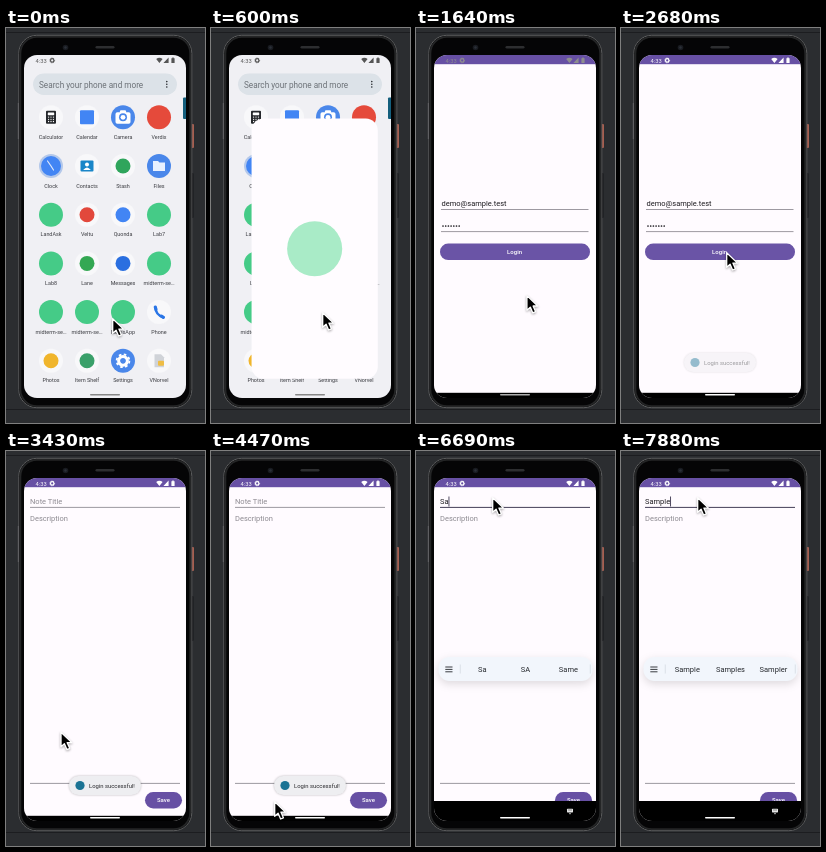
Recreate the animation shown at these times as an HTML page. Size 199 by 395 pixels, loop 8 s.

```html
<!DOCTYPE html>
<html lang="en">
<head>
<meta charset="utf-8">
<title>Notes app walkthrough</title>
<style>
html, body { margin: 0; width: 100%; height: 100%; overflow: hidden; background: #2b2d30; }
svg { display: block; width: 100%; height: 100%; font-family: Roboto, sans-serif; }
.label { font-size: 5.4px; text-anchor: middle; fill: #3a3b40; }
.field { font-size: 7.5px; fill: #1d1b20; }
.hint { font-size: 7.5px; fill: #8d8a91; }
.btn { font-size: 6px; font-weight: 500; text-anchor: middle; fill: #fff; }
.word { font-size: 7.5px; text-anchor: middle; fill: #24272c; }
.rule { stroke: #85818a; stroke-width: .8; }
#toast { filter: drop-shadow(0 .8px 1px #0004); }
#bar { filter: drop-shadow(0 3px 4px #0002); }
#cursor { filter: drop-shadow(.5px 1px .8px #0005); }
</style>
</head>
<body>
<svg viewBox="0 0 199 395">
  <defs>
    <clipPath id="glass"><rect x="18" y="27" width="162" height="343" rx="13"/></clipPath>
    <clipPath id="pill"><rect x="24" y="215.6" width="150" height="16.5" rx="8.2"/></clipPath>
  </defs>

  <rect width="199" height="395" fill="#2b2d30"/>
  <path d="M0 4.5H199M0 381.5H199" stroke="#1c1d20"/>
  <rect x="185" y="96" width="3" height="24" rx="1" fill="#a75f50"/>
  <rect x="185" y="145" width="2.5" height="45" rx="1" fill="#17181a"/>
  <rect x="12.8" y="7.3" width="173" height="372.4" rx="18" fill="#050506" stroke="#5c5d5e"/>
  <rect x="14.4" y="8.9" width="169.8" height="369.2" rx="16.5" fill="none" stroke="#242526" stroke-width="1.8"/>
  <path d="M12.3 75V111" stroke="#6b6c6f" stroke-width=".8"/>
  <circle cx="59.5" cy="19.5" r="2.8" fill="#191b20"/>
  <circle cx="59.5" cy="19.5" r="1.2" fill="#2b3038"/>
  <rect x="89.5" y="18" width="19" height="2.6" rx="1.3" fill="#2d2e30"/>

  <g clip-path="url(#glass)">
    <g id="home">
      <rect x="18" y="27" width="162" height="343" fill="#f0f0f4"/>
      <rect x="27" y="45.5" width="144" height="21.5" rx="10.7" fill="#dce2e8"/>
      <text x="33" y="59.6" font-size="8.2" fill="#6c7177">Search your phone and more</text>
      <path d="M160.8 53.6v.01m0 2.7v.01m0 2.7v.01" stroke="#25282c" stroke-width="1.6" stroke-linecap="round"/>
      <g id="apps"></g>
      <rect x="177" y="69.5" width="4" height="21.5" rx="1" fill="#155f7d"/>
    </g>

    <g id="splash">
      <rect id="window" fill="#fffcff"/>
      <circle id="badge" fill="#a9ebc7"/>
    </g>

    <g id="login">
      <rect x="18" y="27" width="162" height="343" fill="#fffbff"/>
      <text class="field" x="25.5" y="178.4">demo@sample.test</text>
      <path class="rule" d="M25 181.5H172.5M25 203.6H172.5"/>
      <path d="M27 198h17" stroke="#1d1b20" stroke-width="1.7" stroke-linecap="round" stroke-dasharray="0 2.7"/>
      <g clip-path="url(#pill)">
        <rect x="24" y="215" width="150" height="18" fill="#6a54a6"/>
        <circle id="ripple" cx="100.5" cy="224" r="64" fill="#fff"/>
      </g>
      <text class="btn" x="98.6" y="226">Login</text>
    </g>

    <g id="notes">
      <rect x="18" y="27" width="162" height="343" fill="#fffbff"/>
      <text class="hint" id="titleHint" x="24" y="53.4">Note Title</text>
      <text class="field" id="title" x="24" y="53.4"></text>
      <path id="caret" d="M0 45.5V55.5" stroke="#3d3650" stroke-width=".9"/>
      <path id="titleRule" class="rule" d="M24 56.4H174"/>
      <text class="hint" x="24" y="69.6">Description</text>
      <path class="rule" d="M24 332.4H174"/>
      <rect x="139" y="341" width="37" height="16.4" rx="8.2" fill="#6750a4"/>
      <text class="btn" x="157.5" y="351.4">Save</text>
    </g>

    <g id="bars">
      <rect x="18" y="27" width="162" height="9.2" fill="#6750a4"/>
      <rect id="dock" x="18" width="162" height="30" fill="#000"/>
    </g>
    <g id="keys">
      <rect x="151" y="357.8" width="6" height="3.6" rx=".6" fill="#e6e6e6"/>
      <path d="M152 359h4" stroke="#000" stroke-width=".6" stroke-dasharray=".7 .4"/>
      <path d="M152.8 362.3h2.4l-1.2 1.2Z" fill="#e6e6e6"/>
    </g>

    <g id="status" fill="currentColor">
      <text x="29.6" y="34.6" font-size="5.8">4:33</text>
      <circle cx="46.2" cy="32.4" r="1.7" fill="none" stroke="currentColor" stroke-width="1.2"/>
      <circle cx="46.2" cy="32.4" r="2.4" fill="none" stroke="currentColor" stroke-width=".8" stroke-dasharray="1 .885"/>
      <path d="M150.2 30.9Q153.4 28.6 156.6 30.9L153.4 35ZM162.6 29.6V35H157.4Z"/>
      <path d="M165.4 30.2h.9v-.8h1.4v.8h.9V35.1h-3.2Z"/>
    </g>
    <rect id="handle" x="84" y="366" width="30" height="1.5" rx=".75" fill="currentColor"/>

    <g id="bar">
      <rect x="22.5" y="206" width="154" height="24" rx="11" fill="#f2f6fc"/>
      <path d="M29.3 216h7.2m-7.2 2.4h7.2m-7.2 2.4h7.2" stroke="#24272c" stroke-width=".9"/>
      <path d="M44.3 213.5v9M174.3 213.5v9" stroke="#d3d7de" stroke-width=".7"/>
      <text class="word" x="66.3" y="220.8"></text>
      <text class="word" x="109.5" y="220.8"></text>
      <text class="word" x="152.4" y="220.8"></text>
    </g>

    <g id="toast">
      <rect x="63" y="325" width="72" height="19" rx="9.5" fill="#eeeef1"/>
      <circle cx="74" cy="334.5" r="4.6" fill="#1b7394"/>
      <text x="83" y="336.7" font-size="5.9" fill="#2a2a2e">Login successful!</text>
    </g>
  </g>

  <path id="cursor" d="M.7 .7V15.3L4.1 12.2 6.6 18 9.4 16.8 6.9 11.1H11.5Z"
        fill="#000" stroke="#fff" stroke-width="1.3" stroke-linejoin="round"/>
</svg>

<script>
const LOOP = 8000, STEP = 148.6;
const $ = id => document.getElementById(id);
const set = (el, attrs) => { for (const k in attrs) el.setAttribute(k, attrs[k]); };
const show = (id, alpha) => set($(id), { opacity: alpha, visibility: alpha > 0 ? 'visible' : 'hidden' });
const mix = (a, b, p) => a + (b - a) * p;

// App icons, drawn around 0,0
const disc = (color, r = 12) => `<circle r="${r}" fill="${color}"/>`;
const box = (x, y, w, h, color, r = 1) =>
  `<rect x="${x}" y="${y}" width="${w}" height="${h}" rx="${r}" fill="${color}"/>`;
const line = (d, color, w) =>
  `<path d="${d}" fill="none" stroke="${color}" stroke-width="${w}" stroke-linecap="round"/>`;
const white = disc('#f8f8fa'), blue = disc('#4a87ea'), green = disc('#45cb87');
const dot = color => white + disc(color, 7.5);

const apps = [
  ['Calculator', white + box(-5, -6.5, 10, 13, '#26282c') + box(-3.2, -4.7, 6.4, 2.6, '#fff', .4) +
    [-.2, 2, 4.2].map(y => line(`M-2.4 ${y}h.01M0 ${y}h.01M2.4 ${y}h.01`, '#fff', 1.3)).join('')],
  ['Calendar', white + box(-7, -7, 14, 14, '#4285f4')],
  ['Camera', blue + box(-7.5, -5, 15, 11.5, '#fff', 1.8) + box(-3, -7, 6, 4, '#fff') +
    disc('#4a87ea', 4) + disc('#fff', 2.4)],
  ['Verdix', disc('#e54a3b')],
  ['Clock', disc('#b4c8ea') + disc('#4285f4', 10) + line('M-3.5 -5L0 0L2.5 4', '#dfe9fb', 1.2)],
  ['Contacts', white + box(-6.5, -5.5, 13, 11, '#1a86c8') +
    '<circle cy="-1.6" r="2" fill="#fff"/><path d="M-3.8 4Q0-1 3.8 4Z" fill="#fff"/>'],
  ['Stash', dot('#2fa55c')],
  ['Files', blue + '<path d="M-6-5H-1L.5-3.5H6V5H-6Z" fill="#e9f1ff"/>'],
  ['LandAsk', green], ['Veltu', dot('#e2483c')], ['Quonda', dot('#4285f4')], ['Lab7', green],
  ['Lab8', green], ['Lane', dot('#34a853')], ['Messages', dot('#2a6fe0')], ['midterm-se…', green],
  ['midterm-se…', green], ['midterm-se…', green], ['NotesApp', green],
  ['Phone', white + line('M-3.6-5Q-3.5 3 4.4 5.2', '#2a75e6', 2.4) +
    line('M-3.7-5L-3-2.6M4.4 5.2L2.4 4', '#2a75e6', 3.2)],
  ['Photos', dot('#f0b52c')], ['Item Shelf', dot('#3aa06a')],
  ['Settings', blue + '<circle r="4.4" fill="none" stroke="#fff" stroke-width="3"/>' +
    '<circle r="6.4" fill="none" stroke="#fff" stroke-width="1.8" stroke-dasharray="2.6 2.427"/>'],
  ['VNorvel', white + '<path d="M-4.5-6.5H2L5-3.5V6.5H-4.5Z" fill="#d0d3d8"/>' + box(-1, 0, 6, 5, '#efbd45')]
];
$('apps').innerHTML = apps.map(([name, art], i) => {
  const x = 45 + i % 4 * 36, y = 89.3 + Math.floor(i / 4) * 48.7;
  return `<g transform="translate(${x} ${y})">${art}<text class="label" y="21.6">${name}</text></g>`;
}).join('');

// Time, typed text, middle and right suggestion
const typing = [
  [0, '', '', ''],
  [6380, 'S', 'So', 'See'],
  [6680, 'Sa', 'SA', 'Same'],
  [7280, 'Sam', 'Same', 'Sample'],
  [7425, 'Samp', 'Sample', 'Samples'],
  [7725, 'Sampl', 'Sample', 'Samples'],
  [7870, 'Sample', 'Samples', 'Sampler']
];

// Pointer moves: start, end, control point, end point
const moves = [
  [0, 140, 108, 287, 111, 284],
  [1487, 1930, 110, 250, 105, 224],
  [2680, 2970, 105, 227, 104, 230],
  [3125, 3865, 5, 310, 63, 350],
  [4470, 5345, 40, 200, 76, 46]
];
const words = document.querySelectorAll('.word');

function draw(ms) {
  const t = Math.floor(ms % LOOP / STEP) * STEP;
  const ramp = (a, b) => Math.min(1, Math.max(0, (t - a) / (b - a)));
  const ease = p => p * p * (3 - 2 * p);

  // App launch: a window grows out of its icon
  const grow = 1 - (1 - ramp(300, 900)) ** 2;
  show('home', t < 900 ? 1 : 0);
  show('splash', t > 300 && t < 1480 ? Math.min(1, grow * 2) : 0);
  set($('window'), {
    x: mix(105, 18, grow), y: mix(272, 27, grow),
    width: mix(24, 162, grow), height: mix(24, 343, grow), rx: 12
  });
  set($('badge'), { cx: mix(117, 99, grow), cy: mix(284, 198.5, grow), r: mix(12, 33, grow) });

  const enter = ramp(1190, 1486), open = ramp(2680, 2970);
  show('login', open < 1 ? enter : 0);
  show('bars', enter);
  show('ripple', t > 2220 && t < 2670 ? .08 : 0);
  show('notes', open);
  set($('notes'), { transform: `translate(${16 * (1 - open) ** 2} 0)` });
  show('toast', t < 4000 ? ramp(2550, 2820) : 1 - ramp(4500, 4900));

  const lighten = ramp(1486, 1930);
  const gray = from => `rgb(${Array(3).fill(Math.round(mix(from, 255, lighten)))})`;
  $('status').style.color = gray(85);
  $('handle').style.color = gray(135);

  // Keyboard strip and typing
  const rise = ramp(5650, 6090);
  set($('dock'), { y: mix(364.8, 350, ease(rise)) });
  show('keys', rise === 1 ? 1 : 0);
  show('bar', ramp(5940, 6380));
  const [, typed, ...next] = typing.findLast(row => t >= row[0]);
  $('title').textContent = typed;
  [typed, ...next].forEach((w, i) => words[i].textContent = w);
  show('titleHint', typed ? 0 : 1);
  show('caret', t > 5780 ? 1 : 0);
  set($('caret'), { transform: `translate(${24.4 + (typed && $('title').getComputedTextLength())} 0)` });
  const focused = t > 5490;
  $('titleRule').style.stroke = focused ? '#453f58' : '';
  $('titleRule').style.strokeWidth = focused ? 1 : '';

  let x = 106, y = 290;
  for (const [a, b, cx, cy, ex, ey] of moves) {
    const p = ease(ramp(a, b));
    const bend = (s, c, e) => mix(mix(s, c, p), mix(c, e, p), p);
    x = bend(x, cx, ex);
    y = bend(y, cy, ey);
    if (p < 1) break;
  }
  set($('cursor'), { transform: `translate(${x} ${y})` });
}

const start = performance.now();
function tick() {
  draw(performance.now() - start);
  requestAnimationFrame(tick);
}
tick();
</script>
</body>
</html>
```
